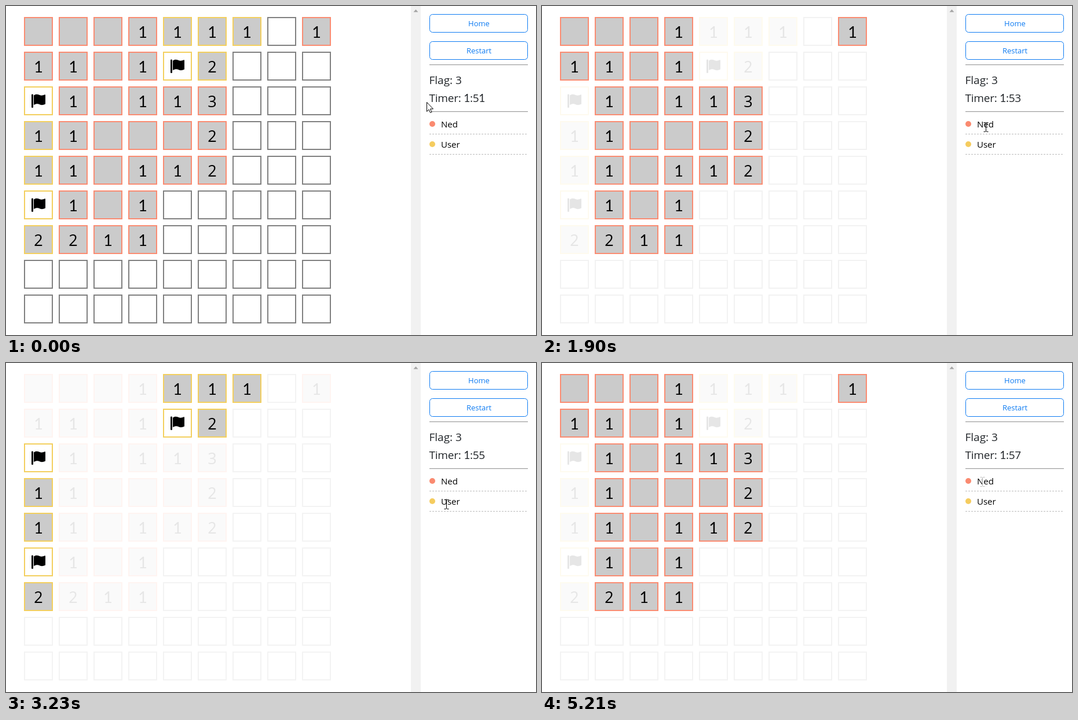
Animation of 915x569 px, one loop 5590 ms. Source, as an HTML page:

```html
<!DOCTYPE html>
<html lang="en">
<head>
<meta charset="utf-8">
<title>Minesweeper</title>
<style>
  html, body { margin: 0; width: 100%; height: 100%; overflow: hidden; background: #fff; }
  svg { display: block; }
  text { font-family: "Open Sans", "Noto Sans", sans-serif; fill: #212529; }
  .one { font-family: Lato, "Open Sans", sans-serif; }
  .num { font-size: 27px; text-anchor: middle; fill: #000; }
  .btn rect { fill: #fff; stroke: #0d7bf2; }
  .btn text { font-size: 13px; text-anchor: middle; fill: #0d7bf2; }
  .info { font-size: 19px; }
  .name { font-size: 15px; fill: #000; }
</style>
</head>
<body>
<svg id="stage" width="915" height="569" viewBox="0 0 915 569">
  <rect width="915" height="569" fill="#fff"/>
  <g id="red"></g>
  <g id="yellow"></g>
  <g id="blank"></g>
  <rect x="699" width="17" height="569" fill="#f1f1f1"/>
  <path d="M703.5 10.5L707.5 6L711.5 10.5Z" fill="#a3a3a3"/>
  <g class="btn">
    <rect x="731.5" y="14.5" width="169" height="31" rx="5"/>
    <text x="816.5" y="35">Home</text>
    <rect x="731.5" y="61.5" width="169" height="31" rx="5"/>
    <text x="816.5" y="82">Restart</text>
  </g>
  <path d="M731 101.5H901M731 182.5H901" stroke="#9a9a9a"/>
  <path d="M731 102.5H901M731 183.5H901" stroke="#eee"/>
  <text class="info" x="730.5" y="135">Flag: 3</text>
  <text class="info" id="timer" x="730.5" y="166" letter-spacing="-.25"></text>
  <circle cx="736" cy="204" r="5" fill="#fa8a70"/>
  <text class="name" x="751" y="210">Ned</text>
  <circle cx="736" cy="239" r="5" fill="#f5cc5f"/>
  <text class="name" x="751" y="245">User</text>
  <path d="M731 221.5H901M731 256.5H901" stroke="#bbb" stroke-dasharray="3 2"/>
  <path id="arrow" d="M.5 .5V16.5L4 13L6.5 18.5L9 17.5L6.5 12H11.5Z" fill="#fff" stroke="#000"/>
  <path id="beam" d="M-3.5 -7.5H-1L.5 -6.5L2 -7.5H4.5M-3.5 8.5H-1L.5 7.5L2 8.5H4.5M.5 -6.5V7.5" fill="none" stroke="#000"/>
</svg>
<script>
const LOOP = 5590;
const $ = id => document.getElementById(id);

// Owner and content of each opened cell: 0 = empty, F = flag
const owners = ["rrrryyy.r", "rrrryy", "yrrrrr", "yrrrrr", "yrrrrr", "yrrr", "yrrr"];
const values = ["0001111.1", "1101F2", "F10113", "110002", "110112", "F101", "2211"];
const kinds = {
  r: { group: "red", line: "#fa8c72" },
  y: { group: "yellow", line: "#f3cf5e" },
  ".": { group: "blank", line: "#808080" }
};
const flag = '<rect x="13" y="13.5" width="3" height="23.5" rx="1.2"/>' +
  '<path d="M17 15.5C20 13.2 23 13.2 26.5 14.8S33 15.6 36 14.2Q37 14 37 15V30.5C33 32.6 30 32.6 27 31.2S20.5 30.2 17 32.2Z"/>';

const digit = v => `<text class="num${v === "1" ? " one" : ""}" x="25" y="35.5">${v}</text>`;

function cell(row, col) {
  const kind = kinds[(owners[row] || "")[col] || "."];
  const value = (values[row] || "")[col] || ".";
  const fill = value === "." || value === "F" ? "#fff" : "#cbcbcb";
  const mark = value === "F" ? flag : value > "0" ? digit(value) : "";
  $(kind.group).innerHTML += `<g transform="translate(${31 + col * 60} ${19 + row * 60})">` +
    `<rect x="1" y="1" width="48" height="48" fill="${fill}" stroke="${kind.line}" stroke-width="2"/>${mark}</g>`;
}
for (let r = 0; r < 9; r++) for (let c = 0; c < 9; c++) cell(r, c);

const clamp = v => v < 0 ? 0 : v > 1 ? 1 : v;

// CSS "ease" curve: cubic-bezier(.25, .1, .25, 1)
function ease(x) {
  if (x <= 0) return 0;
  if (x >= 1) return 1;
  const bez = (a, b, s) => 3 * a * s * (1 - s) ** 2 + 3 * b * s * s * (1 - s) + s ** 3;
  let lo = 0, hi = 1;
  for (let i = 0; i < 24; i++) {
    const mid = (lo + hi) / 2;
    if (bez(.25, .25, mid) < x) lo = mid; else hi = mid;
  }
  return bez(.1, 1, lo);
}

// Opacity changes caused by hovering: [start, target, duration]
const fades = {
  red: [[2000, .1, 1000], [4170, 1, 1000]],
  yellow: [[150, .1, 1000], [1890, 1, 1000], [4225, .1, 1000]],
  blank: [[150, .1, 1000], [1890, 1, 1000], [2000, .1, 110], [4170, 1, 1000], [4225, .1, 55]]
};

function opacity(steps, t) {
  let value = 1;
  steps.forEach(([start, target, span], i) => {
    if (t < start) return;
    const end = i + 1 < steps.length ? Math.min(t, steps[i + 1][0]) : t;
    value += (target - value) * ease((end - start) / span);
  });
  return value;
}

// Pointer moves: [start, end, x, y]
const moves = [[0, 400, 766, 205], [1840, 1900, 766, 209], [1900, 2250, 760, 244],
  [4110, 4330, 760, 208], [4500, 4610, 760, 205]];

function pointer(t) {
  let x = 726, y = 166;
  for (const [start, end, toX, toY] of moves) {
    const k = 1 - (1 - clamp((t - start) / (end - start))) ** 2;
    x += (toX - x) * k;
    y += (toY - y) * k;
  }
  return [Math.round(x), Math.round(y)];
}

const ticks = [280, 1290, 2270, 3230, 4230, 5210];
let shown = "";

function draw(t) {
  for (const id in fades) $(id).setAttribute("opacity", opacity(fades[id], t).toFixed(3));

  const clock = "1:" + (51 + ticks.filter(k => t >= k).length);
  if (clock !== shown) {
    shown = clock;
    $("timer").innerHTML = "Timer: " + clock.replace(/1/g, '<tspan class="one">1</tspan>');
  }

  const [x, y] = pointer(t);
  const onText = x >= 751 && ((y >= 193 && y <= 217) || (y >= 228 && y <= 252));
  $("arrow").setAttribute("visibility", onText ? "hidden" : "visible");
  $("beam").setAttribute("visibility", onText ? "visible" : "hidden");
  $("beam").setAttribute("stroke", t >= 4680 ? "#bdbdbd" : "#000");
  for (const id of ["arrow", "beam"]) $(id).setAttribute("transform", `translate(${x} ${y})`);
}

const begin = performance.now();
function tick() {
  draw((performance.now() - begin) % LOOP);
  requestAnimationFrame(tick);
}
tick();
</script>
</body>
</html>
```
